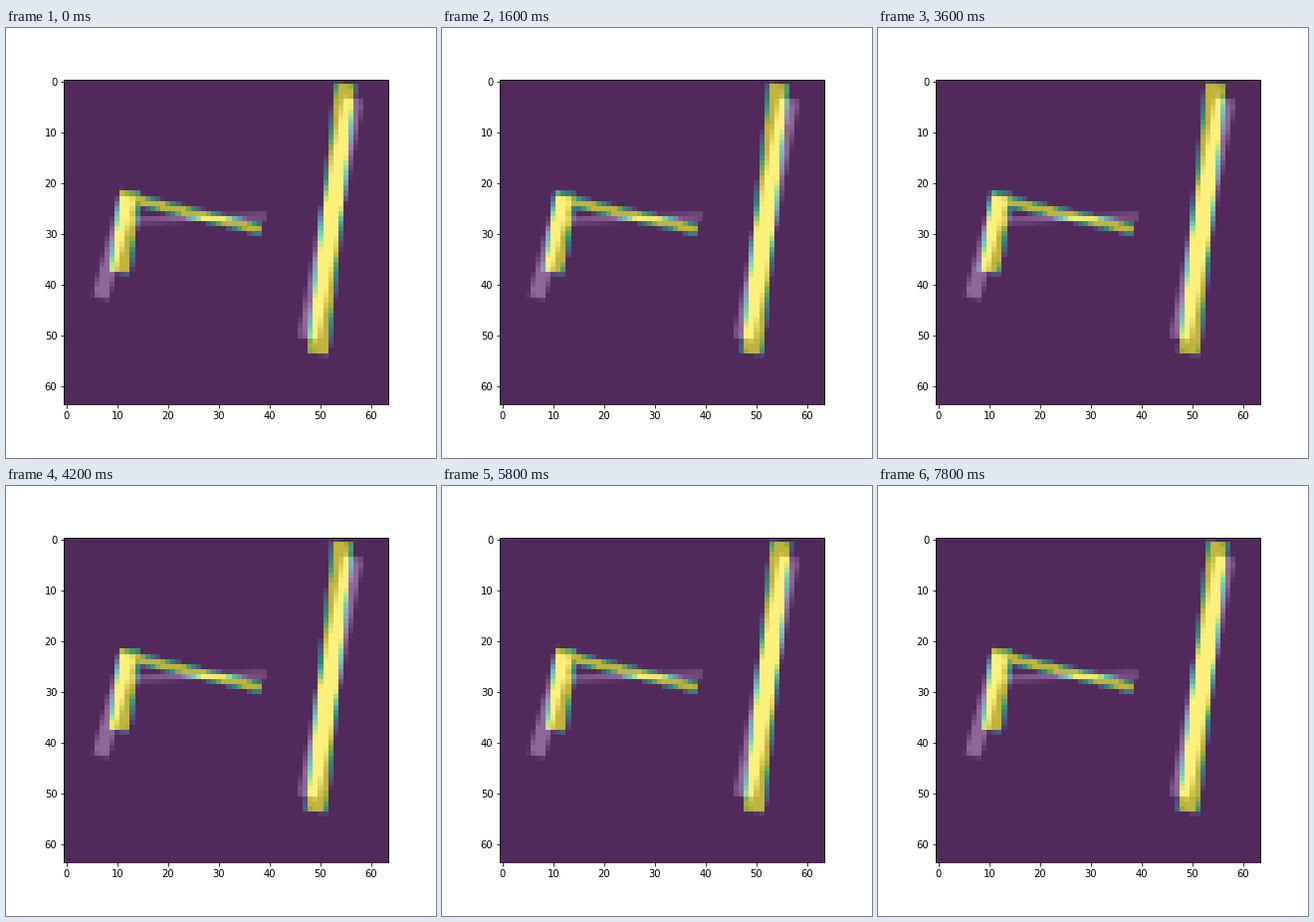
These frames come from a looping animation (432 px wide and 432 px high, 8000 ms). A matplotlib script:

```python
import numpy as np
import matplotlib.pyplot as plt
from matplotlib.animation import FuncAnimation

SIZE = 64
FRAMES = 40
STEP_MS = 200

rows, cols = np.mgrid[0:SIZE, 0:SIZE].astype(float)


def stroke(x0, y0, x1, y1, width):
    """Soft-edged bar with flat ends, as coverage between 0 and 1."""
    length = np.hypot(x1 - x0, y1 - y0)
    ux, uy = (x1 - x0) / length, (y1 - y0) / length
    dx, dy = cols - (x0 + x1) / 2, rows - (y0 + y1) / 2
    along = np.abs(dx * ux + dy * uy)
    across = np.abs(dy * ux - dx * uy)
    return (np.clip(length / 2 + 0.5 - along, 0, 1)
            * np.clip(width / 2 + 0.5 - across, 0, 1))


def merge(*parts):
    return np.maximum.reduce(parts)


def wave(step, peak, period):
    return np.cos(2 * np.pi * (step - peak) / period)


def pose(step):
    """The bar sways at both ends while the leg dips once and recovers."""
    bar_top = 54.7 - 0.35 * wave(step, 8, 12.5)
    bar_foot = 49.25 + 0.2 * wave(step, -1, 15.5)
    dip = np.exp(-((step - 13) / 6) ** 2)
    leg_top, leg_foot = 12.6 - 0.4 * dip, 10.5 - 0.8 * dip
    top_y = 21.65 + 0.7 * dip
    return merge(
        stroke(bar_top, 0.5, bar_foot, 53.5, 4),
        stroke(leg_top, top_y, leg_foot, 37.6, 4),
        stroke(leg_top, top_y + 1.3, 38.4, 29.25, 2),
    )


goal = merge(
    stroke(56.4, 3.6, 47.6, 50.5, 4),
    stroke(12.1, 22.6, 6.7, 42.5, 3.2),
    stroke(11, 27.5, 39.4, 26.5, 1),
)

fig, ax = plt.subplots(figsize=(6, 6), dpi=72)
fig.subplots_adjust(left=0.125, right=0.9, bottom=0.125, top=0.88)
ax.imshow(0.4 + 0.6 * goal, cmap="gray", vmin=0, vmax=1,
          interpolation="nearest")
layer = ax.imshow(pose(0), cmap="viridis", vmin=0, vmax=1, alpha=0.6,
                  interpolation="nearest")


def update(step):
    layer.set_data(pose(step))
    return (layer,)


anim = FuncAnimation(fig, update, frames=FRAMES, interval=STEP_MS,
                     repeat=True, repeat_delay=0)
plt.show()
```
